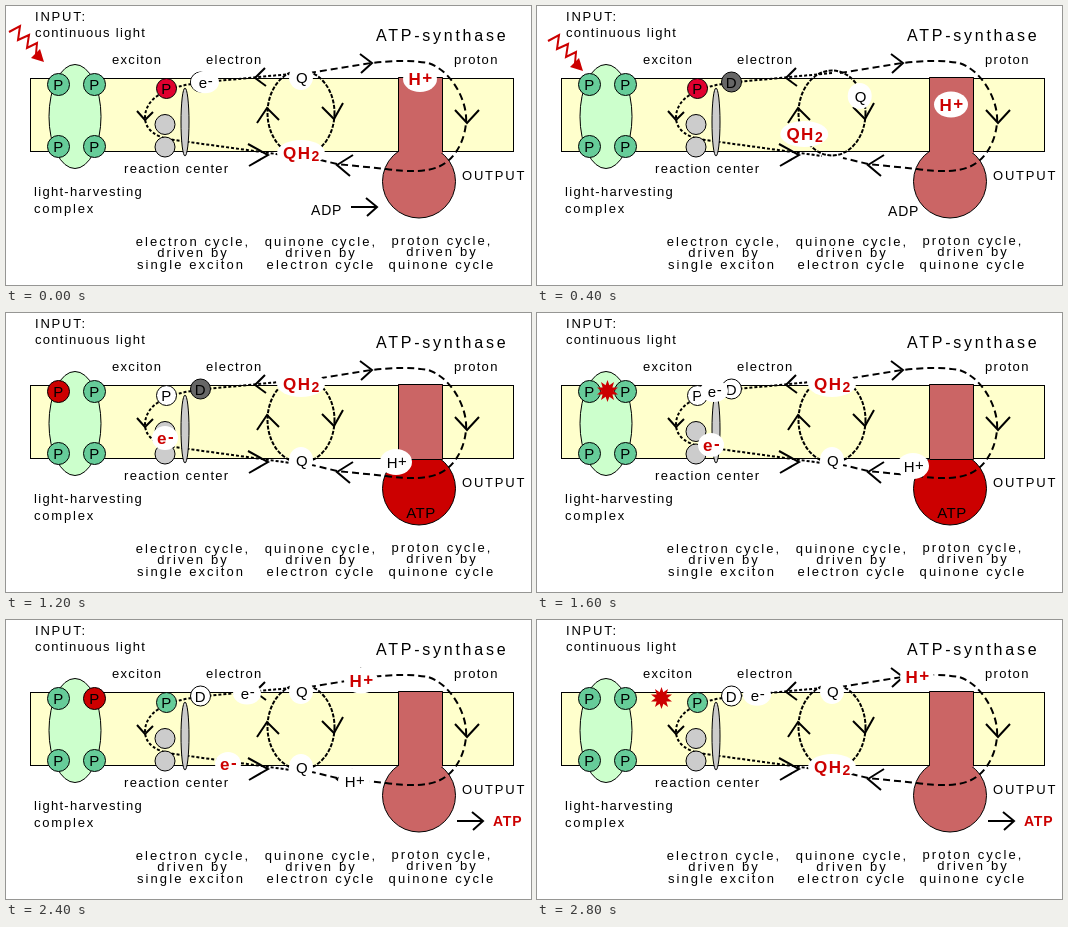
These frames come from a looping animation (525 by 279 pixels, 3200 ms). An HTML page:

```html
<!DOCTYPE html>
<html lang="en">
<head>
<meta charset="utf-8">
<title>Photosynthesis cycles</title>
<style>
html, body { margin: 0; width: 100%; height: 100%; overflow: hidden; background: #fff; }
svg { display: block; width: 100%; height: 100%; }
text { font: 13px "Liberation Sans", Arial, sans-serif; letter-spacing: 1.3px; fill: #000; }
.caption text { text-anchor: middle; letter-spacing: 2.1px; }
.wide { letter-spacing: 1.8px; }
.title { font-size: 16px; letter-spacing: 2.75px; }
.adp { font-size: 14px; letter-spacing: .8px; }
.atp { font-size: 14px; font-weight: bold; letter-spacing: .8px; fill: #c00; }
.mid { text-anchor: middle; font-size: 15px; letter-spacing: .5px; }
.hot { font-weight: bold; font-size: 17px; letter-spacing: 1.5px; fill: #c00; }
.line { fill: none; stroke: #000; stroke-width: 2; }
.ink { stroke: #000; stroke-width: 1; }
.step { visibility: hidden; animation: show 3.2s step-end infinite; }
@keyframes show { 0% { visibility: visible; } 12.5%, 100% { visibility: hidden; } }
</style>
</head>
<body>
<svg viewBox="0 0 525 279">
  <rect class="ink" x="24.5" y="72.5" width="483" height="73" fill="#ffc"/>
  <g id="back"></g>
  <g class="line">
    <path stroke-dasharray="3 2" d="M295 67L200 76Q139 82 139 112Q140 130 168 134L285 150"/>
    <ellipse cx="295" cy="107" rx="33.5" ry="42.5" stroke-dasharray="4 1.5"/>
    <path stroke-dasharray="7 4" d="M303 67L365 57Q400 53 422 57C445 64 462 95 460 117C458 140 445 156 432 161Q415 168 380 163L331 158L306 152"/>
    <path d="M259 62L249 72L260 80M131 105L139 114L147 106M242 138L262 149L243 160M251 117L261 102L273 114M316 101L328 113L337 97M354 48L366 57L355 67M347 149L331 159L344 170M449 104L461 117L473 104"/>
  </g>
  <ellipse class="ink" cx="69" cy="110.500" rx="26" ry="52" fill="#cfc"/>
  <g class="ink" fill="#ccc">
    <circle cx="159" cy="118.500" r="10"/>
    <circle cx="159" cy="141" r="10"/>
    <ellipse cx="179" cy="116" rx="4" ry="34"/>
  </g>
  <text class="wide" x="29" y="15">INPUT:</text>
  <text x="29" y="31">continuous light</text>
  <text x="106" y="58">exciton</text>
  <text x="200" y="58">electron</text>
  <text x="448" y="58">proton</text>
  <text class="title" x="370" y="35">ATP-synthase</text>
  <text x="118" y="167">reaction center</text>
  <text x="28" y="190">light-harvesting</text>
  <text class="wide" x="28" y="207">complex</text>
  <text class="wide" x="456" y="174">OUTPUT</text>
  <g class="caption">
    <text x="187" y="240">electron cycle,</text>
    <text x="187" y="251">driven by</text>
    <text x="185" y="263">single exciton</text>
    <text x="315" y="240">quinone cycle,</text>
    <text x="315" y="251">driven by</text>
    <text x="315" y="263">electron cycle</text>
    <text x="436" y="239">proton cycle,</text>
    <text x="436" y="250">driven by</text>
    <text x="436" y="263">quinone cycle</text>
  </g>
  <g id="front"></g>
</svg>
<script>
const STEPS = 8, STEP_MS = 400;
const RED = '#c00', GREEN = '#6c9', BROWN = '#cb6565', GRAY = '#666';

const label = (x, y, text, cls = 'mid') => `<text class="${cls}" x="${x}" y="${y}">${text}</text>`;
const disc = (x, y, r, fill, letter) =>
  `<circle class="ink" cx="${x}" cy="${y}" r="${r}" fill="${fill}"/>` + label(x, y + 5.5, letter);
const blob = (rx, ry, text, cls = 'mid') => (x, y) =>
  `<ellipse cx="${x}" cy="${y}" rx="${rx}" ry="${ry}" fill="#fff"/>` + label(x + 1, y + 6, text, cls);
const arrow = x => `<path class="line" d="M${x} 201h26m-11 -9l11 9l-10 9"/>`;
const raised = sign => `<tspan dy="-2">${sign}</tspan>`;

const quinol = blob(24, 13, 'QH<tspan font-size="14" dy="2">2</tspan>', 'mid hot');
const quinone = blob(12, 13, 'Q');
const hotProton = blob(17, 13, 'H' + raised('+'), 'mid hot');
const proton = blob(16, 13, 'H' + raised('+'));
const hotElectron = blob(13, 12, 'e' + raised('-'), 'mid hot');
const electron = blob(14, 11, 'e' + raised('-'));

// Draws a part that moves in a straight line, one stride per step.
const glide = (step, first, last, draw, x, y, dx = 0, dy = 0) => {
  const n = step - first;
  return n >= 0 && step <= last ? draw(x + n * dx, y + n * dy) : '';
};

function star(x, y) {
  const points = Array.from({ length: 20 }, (_, i) => {
    const r = i % 2 ? 6 : 11, a = i * Math.PI / 10;
    return `${(x + r * Math.sin(a)).toFixed(1)},${(y - r * Math.cos(a)).toFixed(1)}`;
  });
  return `<polygon points="${points.join(' ')}" fill="${RED}"/>`;
}

// The light ray speeds up and ends hidden behind the first pigment.
function light(step) {
  if (step > 2) return '';
  const run = step * (step + 1);
  return `<g transform="translate(${4 * run} ${4.5 * run})">
    <path d="M3 26L14 20L12 34L23 29L21 42L31 37L30 48" fill="none" stroke="${RED}" stroke-width="2"/>
    <path d="M38 56L25 52L34 43Z" fill="${RED}"/></g>`;
}

// The exciton rests two steps on each pigment, then spends one step between.
function pigments(step) {
  const sites = [52.5, 88.5, 160.5];
  const phase = (step + 6) % STEPS, at = Math.floor(phase / 3), jumping = phase % 3 === 2;
  const fill = i => !jumping && i === at ? RED : GREEN;
  const centre = step > 1 && step < 5 ? '#fff' : at === 2 ? '#e0002f' : GREEN;
  return [0, 1].map(i => disc(sites[i], 78.5, 11, fill(i), 'P') + disc(sites[i], 140.5, 11, GREEN, 'P')).join('')
    + disc(sites[2], 82.5, 10, centre, 'P')
    + disc(194.5, 76, 10, step > 0 && step < 4 ? GRAY : '#fff', 'D')
    + (jumping ? star((sites[at] + sites[at + 1]) / 2, 78) : '');
}

// Quinone and quinol turn half a round on opposite sides of the cycle.
function quinones(step) {
  const turn = Math.min(step, 3) * Math.PI / 3;
  const onCycle = (draw, a) => draw(295 + 32 * Math.sin(a), 109 - 38 * Math.cos(a));
  if (step === 7) return onCycle(quinone, 0) + onCycle(quinol, Math.PI);
  return onCycle(quinone, turn) + onCycle(step < 5 ? quinol : quinone, turn + Math.PI);
}

function protons(step) {
  return glide(step, 0, 2, hotProton, 414, 73, 0, 25.5)
    + glide(step, 3, 6, proton, 390, 149, -14, 4)
    + glide(step, 5, 7, hotProton, 330, 64, 25, -3.5);
}

function electrons(step) {
  return glide(step, 2, 3, hotElectron, 159, 104, 0, 21)
    + glide(step, 4, 6, hotElectron, 174, 132, 24, 6)
    + glide(step, 4, 4, electron, 177, 78)
    + glide(step || STEPS, 5, STEPS, electron, 262, 72, -21, 1.4);
}

function synthase(step) {
  const active = step >= 3 && step <= 5;
  const seam = active ? 'M392.500 146.500h44' : '';
  return `<circle class="ink" cx="413" cy="175.500" r="36.500" fill="${active ? RED : BROWN}"/>
    <rect x="392" y="71" width="45" height="76" fill="${BROWN}"/>
    <path class="ink" fill="none" d="M392.500 146V71.500h44V146${seam}"/>`;
}

function nucleotide(step) {
  if (step === 0) return label(305, 209, 'ADP', 'adp') + arrow(345);
  if (step === 1) return label(351, 210, 'ADP', 'adp');
  if (step < 6) return label(415, 205, 'ATP');
  return arrow(451) + label(487, 206, 'ATP', 'atp');
}

function fill(id, ...parts) {
  document.getElementById(id).innerHTML = Array.from({ length: STEPS }, (_, i) =>
    `<g class="step" style="animation-delay:${(i - (i ? STEPS : 0)) * STEP_MS}ms">${parts.map(draw => draw(i)).join('')}</g>`).join('');
}
fill('back', synthase);
fill('front', light, pigments, quinones, protons, electrons, nucleotide);
</script>
</body>
</html>
```
